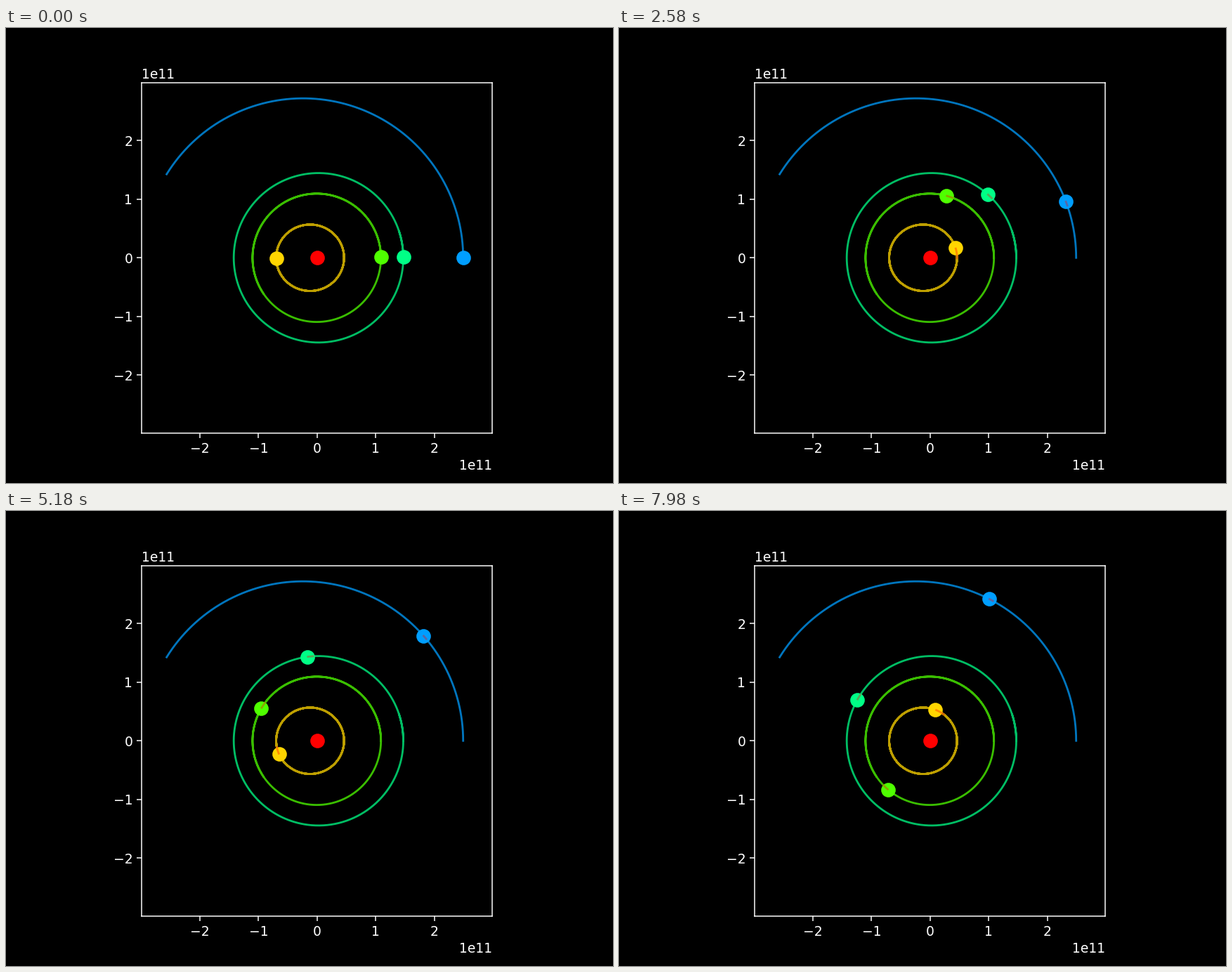
A matplotlib script that plays this animation: 864 by 648 pixels, repeating every 8000 ms.

```python
import numpy as np
import matplotlib.pyplot as plt
from matplotlib.animation import FuncAnimation

GM = 1.32712e20            # sun, m^3/s^2
STEPS = 1000
DT = 365 * 86400 / (STEPS - 1)
TAIL = 10
FRAMES, INTERVAL = 400, 20

# start x (m), start vertical speed (m/s)
PLANETS = [(-6.982e10, -38.86e3),
           (1.0894e11, 35.00e3),
           (1.471e11, 29.78e3),
           (2.492e11, 24.07e3)]


def pull(pos):
    return -GM * pos / np.hypot(*pos) ** 3


def orbit(x, vy):
    """Positions of one planet over a year (velocity Verlet)."""
    pos, vel = np.array([x, 0.0]), np.array([0.0, vy])
    path = np.empty((STEPS, 2))
    acc = pull(pos)
    for i in range(STEPS):
        path[i] = pos
        vel = vel + acc * DT / 2
        pos = pos + vel * DT
        acc = pull(pos)
        vel = vel + acc * DT / 2
    return path


plt.style.use("dark_background")
fig, ax = plt.subplots(figsize=(6.4, 4.8), dpi=135)
limit = 1.2 * 2.492e11
ax.set_aspect("equal")
ax.set_xlim(-limit, limit)
ax.set_ylim(-limit, limit)

paths = [orbit(*p) for p in PLANETS]
colors = [plt.cm.hsv(i / 7) for i in range(5)]

for path, color in zip(paths, colors[1:]):
    ax.plot(*path.T, color=color, alpha=0.75)

ax.plot([0], [0], "o", ms=10, color=colors[0])
dots = [ax.plot([], [], "o", ms=10, color=c)[0] for c in colors[1:]]
tails = [ax.plot([], [], color="red", alpha=0.35)[0] for _ in paths]


def update(frame):
    step = frame + 1
    for path, dot, tail in zip(paths, dots, tails):
        dot.set_data(path[step:step + 1].T)
        recent = path[step - TAIL:step] if step >= TAIL else path[:0]
        tail.set_data(recent.T)
    return dots + tails


anim = FuncAnimation(fig, update, frames=FRAMES, interval=INTERVAL,
                     init_func=lambda: update(0), blit=True,
                     repeat=True, repeat_delay=0)
plt.show()
```
